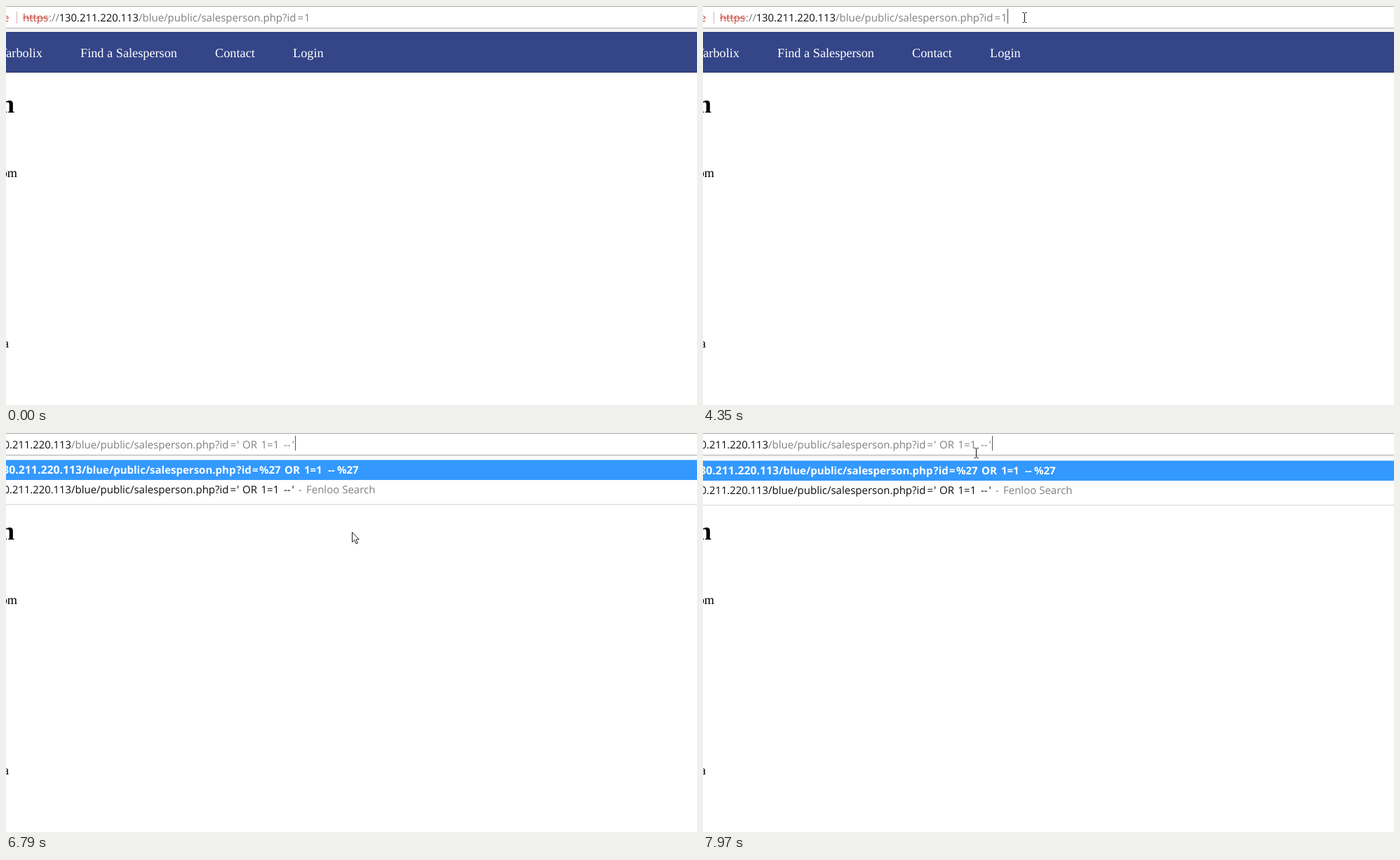
An HTML page for the animation above (8000 ms loop, 985x569 px).

```html
<!DOCTYPE html>
<html lang="en">
<head>
<meta charset="utf-8">
<title>Address bar</title>
<style>
html, body { margin: 0; width: 100%; height: 100%; overflow: hidden; background: #fff; }
svg { display: block; width: 100vw; height: 100vh; }
text { font-family: "Open Sans", "Noto Sans", sans-serif; font-size: 15px; text-rendering: geometricPrecision; }
.ip { font-size: 14.8px; }
.bold { font-weight: 700; }
.bold.ip { font-size: 15.8px; }
.item { font-size: 12.8px; }
.serif { font-family: "Liberation Serif", serif; font-size: 18.28px; }
.h1 { font-size: 36.6px; font-weight: 700; }
</style>
</head>
<body>
<svg id="stage" viewBox="0 0 985 569"></svg>
<script>
const LOOP = 8000;
const GREY = '#808080', INK = '#0c0c0c', BLUE = '#2457c5', SOFT = '#4a70d0', RED = '#c9493f', SELECT = '#3399ff';
const stage = document.getElementById('stage');

function add(parent, tag, attrs, content) {
  const node = document.createElementNS(stage.namespaceURI, tag);
  for (const key in attrs) node.setAttribute(key, attrs[key]);
  if (content) node.textContent = content;
  parent.appendChild(node);
  return node;
}
const group = parent => add(parent, 'g', {});
const rect = (parent, x, y, width, height, fill) => add(parent, 'rect', { x, y, width, height, fill });
const text = (parent, x, y, content, fill, cls = '', anchor = 'start') =>
  add(parent, 'text', { x, y, fill, class: cls, 'text-anchor': anchor }, content);
const words = (parent, y, fill, cls, list) => list.forEach(([x, word]) => text(parent, x, y, word, fill, cls));

// Page
const NAV = '#344588';
rect(stage, 0, 0, 985, 569, '#fff');
rect(stage, 0, 37, 985, 58, NAV);
rect(stage, 0, 37, 985, 1, '#2c3c7c');
rect(stage, 0, 94, 985, 1, '#27336a');
text(stage, 52, 73, 'Varbolix', '#fff', 'serif', 'end');
words(stage, 73, '#fff', 'serif', [[106, 'Find a Salesperson'], [298, 'Contact'], [409, 'Login']]);
text(stage, 12, 152, 'n', '#000', 'serif h1', 'end');
text(stage, 16, 244, 'om', '#000', 'serif', 'end');
text(stage, 4, 487, 'a', '#000', 'serif', 'end');

// Address bar
rect(stage, 0, 0, 985, 1, '#a8a8a8');
rect(stage, 0, 31, 985, 1, '#b0b0b0');
rect(stage, 0, 32, 985, 5, '#f2f2f2');

function address(parent, ipEnd, y, ipFill, pathFill, bold = '') {
  const query = ipEnd + (bold ? 220.5 : 205);
  text(parent, ipEnd, y, '130.211.220.113', ipFill, bold + ' ip', 'end');
  words(parent, y, pathFill, bold, [
    [ipEnd, '/blue/public/salesperson.php'], [query, '?id'], [query + (bold ? 22.5 : 21.5), '=']
  ]);
}

function fullUrl(schemeFill, strikeFill, slashFill, ipFill, pathFill, selected) {
  const g = group(stage);
  text(g, 4.5, 22, 'e', RED, '', 'end');
  rect(g, 15, 8, 1, 17, '#d9b3ae');
  if (selected) rect(g, 24, 4, 410, 22, SELECT);
  text(g, 24, 22, 'https', schemeFill);
  rect(g, 24, 16.5, 37, 1, strikeFill);
  text(g, 61, 22, '://', slashFill);
  address(g, 189, 22, ipFill, pathFill);
  text(g, 425, 22, '1', pathFill);
  return g;
}
const plainUrl = fullUrl(RED, RED, GREY, INK, GREY, false);
const selectedUrl = fullUrl('#fff', '#44608a', '#fff', '#fff', '#fff', true);

const INJECTED = [[329, "'"], [337, 'OR'], [363.5, '1=1'], [396, '--'], [407.5, "'"]];
const editUrl = group(stage);
address(editUrl, 93, 22, INK, GREY);
const pasted = group(editUrl);
words(pasted, 22, GREY, '', INJECTED);

// Suggestions
function dropdown(bottom) {
  const g = group(stage);
  rect(g, 0, 32, 985, bottom - 32, '#fff');
  rect(g, 0, 32, 985, 2, '#f4f4f4');
  rect(g, 0, 38, 985, 1, '#8cc5fb');
  rect(g, 0, 39, 985, 28, SELECT);
  rect(g, 0, bottom - 1, 985, 2, '#e8e8e8');
  address(g, 108, 58, '#fff', '#fff', 'bold');
  return g;
}
function searchRow(g, y, dashX) {
  address(g, 93, y, INK, INK);
  words(g, y, GREY, '', [[dashX, '-'], [dashX + 11, 'Fenloo Search']]);
}
function historyRow(g, y, query, dashX, person) {
  address(g, 108, y, BLUE, BLUE, 'bold');
  words(g, y, SOFT, '', query);
  text(g, dashX, y, '-', GREY);
  text(g, dashX + 11, y, 'Salesperson: ' + person, INK, 'ip');
}

const longList = dropdown(187);
const query = [[361, '%27'], [395, 'OR'], [421, 'id=3'], [458, '--'], [471, '%27']];
historyRow(longList, 86, query, 506, 'Irela Fosbin');
historyRow(longList, 114, [[361, '3']], 374.5, 'Irela Fosbin');
historyRow(longList, 143, [[361, '2']], 374.5, 'Nellie Tarvost');
searchRow(longList, 172, 335);

const shortList = dropdown(102);
words(shortList, 58, '#fff', 'bold', [[361, '%27'], [397, 'OR'], [425, '1=1'], [459, '--'], [472, '%27']]);
searchRow(shortList, 86, 417);
words(shortList, 86, INK, '', INJECTED);

// Context menu
const menu = group(stage);
rect(menu, 447, 26, 246, 261, 'rgba(0,0,0,.15)');
rect(menu, 446, 25, 246, 261, 'rgba(0,0,0,.4)');
rect(menu, 443, 22, 248, 263, '#a3a3a3');
rect(menu, 444, 23, 246, 261, '#fff');
[58, 207, 247].forEach(y => rect(menu, 446, y, 243, 1, '#e4e4e4'));
[
  [44.5, 'Undo', 'Z', 1], [84.5, 'Cut', 'X', 0], [112, 'Copy', 'C', 0], [139, 'Paste', 'V', 1],
  [166, 'Paste and search', '', 1], [193.5, 'Delete', '', 0],
  [233.5, 'Select all', 'A', 1], [272.5, 'Edit search engines...', '', 1]
].forEach(([y, label, key, enabled]) => {
  text(menu, 473, y, label, enabled ? INK : '#9c9890', 'item');
  if (key) text(menu, 663, y, 'Ctrl+' + key, '#928e84', 'item', 'end');
});

const caret = rect(stage, 0, 4, 1, 21, '#555');

// Pointers: the beam is centred on its position, the arrow tip sits on it
const pointers = {
  beam: add(stage, 'path', { d: 'M-3-7h2l1 1 1-1h2M0-6V6M-3 7h2l1-1 1 1h2', fill: 'none', stroke: '#111' }),
  arrow: add(stage, 'path', {
    d: 'M.5.5V14.5l3.2-3 2.5 5.5 2.2-1-2.4-5.2h4.3z', fill: '#fff', stroke: '#222', 'stroke-linejoin': 'round'
  })
};

const pointerSteps = [
  [0, '', 0, 0],
  [280, 'beam', 446.5, 8.5], [420, 'beam', 446.5, 15.5],
  [690, 'beam', 446.5, 18.5], [820, 'beam', 446.5, 20.5],
  [1130, 'beam', 445.5, 21.5], [1280, 'beam', 446.5, 20.5],
  [2140, 'beam', 452.5, 25.5], [2270, 'arrow', 464, 33], [2410, 'arrow', 471, 35],
  [2550, 'arrow', 468, 32], [2680, 'beam', 462.5, 20.5], [2820, 'beam', 458.5, 16.5],
  [5220, 'beam', 456.5, 18.5], [5360, 'beam', 451.5, 21.5], [5500, 'beam', 447.5, 23.5], [5640, 'beam', 446.5, 24.5],
  [5920, 'arrow', 443, 24],
  [6230, 'arrow', 450, 40], [6370, 'arrow', 466, 78], [6510, 'arrow', 482, 116], [6650, 'arrow', 491, 136],
  [6780, 'arrow', 493, 141],
  [7310, 'arrow', 488, 132], [7440, 'arrow', 468, 108], [7570, 'arrow', 440, 78],
  [7700, 'arrow', 413, 52], [7830, 'arrow', 396, 35], [7970, 'beam', 389.5, 28.5]
];
const caretSteps = [
  [0, 0], [3220, 434], [3780, 0], [4350, 434], [4650, 330], [5220, 0], [5640, 330],
  [6780, 412], [7310, 0], [7830, 412]
];
const at = (steps, t) => steps.findLast(step => step[0] <= t);
const show = (node, on) => node.setAttribute('visibility', on ? 'inherit' : 'hidden');

function draw(now) {
  const t = now % LOOP;
  const selected = t >= 1990 && t < 3220, editing = t >= 4650, done = t >= 6780;
  show(plainUrl, !selected && !editing);
  show(selectedUrl, selected);
  show(editUrl, editing);
  show(pasted, done);
  show(longList, editing && !done);
  show(shortList, done);
  shortList.setAttribute('transform', `translate(0 ${t >= 7700 ? 1 : 0})`);
  show(menu, t >= 5920 && !done);

  const caretX = at(caretSteps, t)[1];
  show(caret, caretX);
  caret.setAttribute('x', caretX);

  const [, kind, x, y] = at(pointerSteps, t);
  for (const name in pointers) {
    show(pointers[name], name === kind);
    pointers[name].setAttribute('transform', `translate(${x} ${y})`);
  }
}

const start = performance.now();
function tick() {
  draw(performance.now() - start);
  requestAnimationFrame(tick);
}
tick();
</script>
</body>
</html>
```
